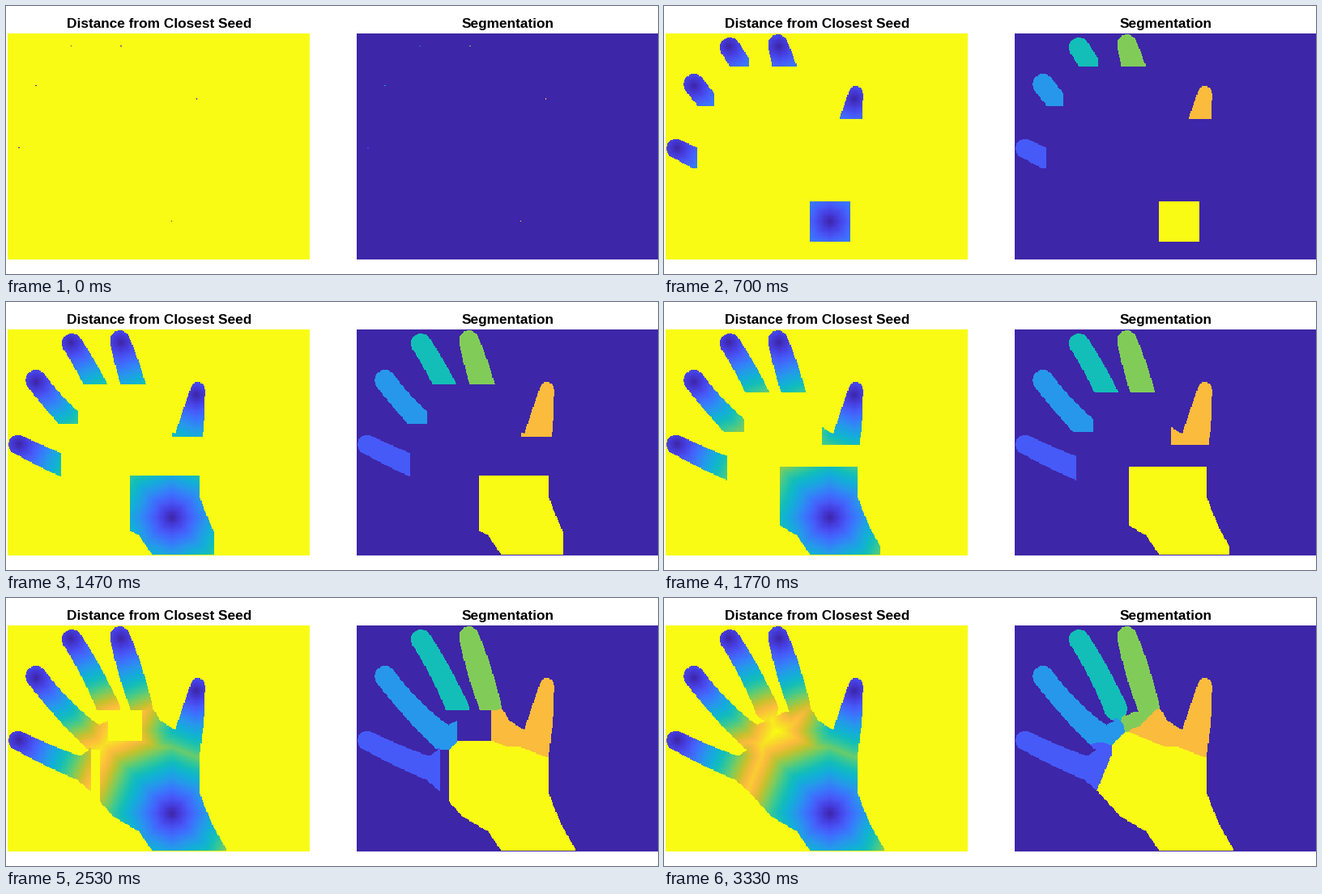
These frames come from a looping animation (805x332 px, 3360 ms). A matplotlib script:

```python
import numpy as np
import matplotlib.pyplot as plt
from matplotlib.animation import FuncAnimation
from matplotlib.colors import LinearSegmentedColormap
from matplotlib.path import Path

STAGE_W, STAGE_H, DPI = 805, 332, 64
GRID_W, GRID_H = 320, 240
SCALE = 373 / GRID_W            # stage pixels per grid cell
LEFT, TOP = 1.5, 34.07          # stage position of the left grid
LAST_STEP = 100
TICKS, TICK_MS = 336, 10

# Each finger is a bent, tapering tube through (x, y, radius) at tip, middle, base
FINGERS = [
    [(15, 176.5, 12), (53, 195, 13), (90, 210.5, 14.5)],
    [(37, 97, 13), (65.5, 131.5, 13.2), (95.5, 161.5, 15)],
    [(81.5, 51.5, 12.5), (102.5, 87, 13), (120.5, 123, 13.8)],
    [(140.5, 48, 12.5), (152.5, 87, 14.8), (163.5, 123, 14.3)],
    [(237, 108, 8.7), (233, 130, 12.4), (228.7, 152, 15.4)],
]
PALM = [(88, 225), (90, 196), (101, 190), (116, 157), (147, 142), (182, 138),
        (190, 151), (208, 163), (243, 160), (239, 200), (239, 240), (244, 255),
        (256, 283), (273, 313), (180, 313), (165, 290), (132, 270), (105, 240)]

# (column, row) of each seed, in label order
SEEDS = [(12, 121), (30, 55), (67, 13), (120, 13), (200, 69), (174, 199)]

PARULA = LinearSegmentedColormap.from_list("parula", [
    "#3e26a8", "#463ddf", "#475bf9", "#3879fc", "#2797eb", "#13aed9", "#12beb9",
    "#3dc991", "#81cc59", "#c9c12c", "#fcbb3e", "#f8db2a", "#f9fb15"])


def hand_mask():
    x, y = np.meshgrid(LEFT + (np.arange(GRID_W) + 0.5) * SCALE,
                       TOP + (np.arange(GRID_H) + 0.5) * SCALE)
    points = np.column_stack([x.ravel(), y.ravel()])
    mask = Path(PALM).contains_points(points).reshape(x.shape)
    for nodes in FINGERS:
        curve = np.polyfit([0, 0.5, 1], nodes, 2)
        for t in np.linspace(0, 1.2, 60):   # run on a little into the palm
            cx, cy, r = np.array([t * t, t, 1]) @ curve
            mask |= np.hypot(x - cx, y - cy) <= r
    return mask


def relax(dist, label, mask):
    """One simultaneous relaxation over the eight neighbours of each cell."""
    near = np.pad(dist, 1, constant_values=np.inf)
    names = np.pad(label, 1)
    dist, label = dist.copy(), label.copy()
    for dy in (-1, 0, 1):
        for dx in (-1, 0, 1):
            window = np.s_[1 + dy:1 + dy + GRID_H, 1 + dx:1 + dx + GRID_W]
            through = near[window] + np.hypot(dx, dy)
            better = mask & (through < dist - 1e-9)
            dist[better] = through[better]
            label[better] = names[window][better]
    return dist, label


def simulate():
    mask = hand_mask()
    dist = np.full((GRID_H, GRID_W), np.inf)
    label = np.zeros((GRID_H, GRID_W), int)
    for number, (col, row) in enumerate(SEEDS, 1):
        dist[row, col], label[row, col] = 0, number
    states = [(dist, label)]
    for _ in range(LAST_STEP):
        states.append(relax(*states[-1], mask))
    return states


def cells(first, last, origin, count):
    """Grid index under the centre of each stage pixel."""
    index = np.floor((np.arange(first, last) + 0.5 - origin) / SCALE).astype(int)
    return np.clip(index, 0, count - 1)


states = simulate()
final = states[-1][0]
far = final[np.isfinite(final)].max()
cols = cells(2, 375, LEFT, GRID_W)
rows = cells(34, 314, TOP, GRID_H)


def paint(values, width):
    rgb = PARULA(values, bytes=True)[..., :3]
    return rgb[rows][:, cols[:width]]


def pictures(step):
    dist, label = states[step]
    return paint(np.minimum(dist, far) / far, 373), paint(label / len(SEEDS), 372)


fig = plt.figure(figsize=(STAGE_W / DPI, STAGE_H / DPI), dpi=DPI, facecolor="white")
ax = fig.add_axes([0, 0, 1, 1])
ax.axis("off")
maps = [ax.imshow(pic, extent=(x, x + pic.shape[1], 314, 34),
                  aspect="auto", interpolation="nearest")
        for pic, x in zip(pictures(0), (2, 433))]
ax.set_xlim(0, STAGE_W)
ax.set_ylim(STAGE_H, 0)
for x, title in ((188.9, "Distance from Closest Seed"), (619.3, "Segmentation")):
    ax.text(x, 27, title, ha="center", va="baseline", color="black",
            family="Liberation Sans", weight="bold", size=17.25 * 72 / DPI)


def update(tick):
    # Thirty steps a second, each starting on the nearest tick
    step = min((2 * tick + 1) * 3 // 20, LAST_STEP)
    for image, pic in zip(maps, pictures(step)):
        image.set_data(pic)
    return maps


anim = FuncAnimation(fig, update, frames=TICKS, interval=TICK_MS,
                     repeat=True, repeat_delay=0, blit=False)
plt.show()
```
